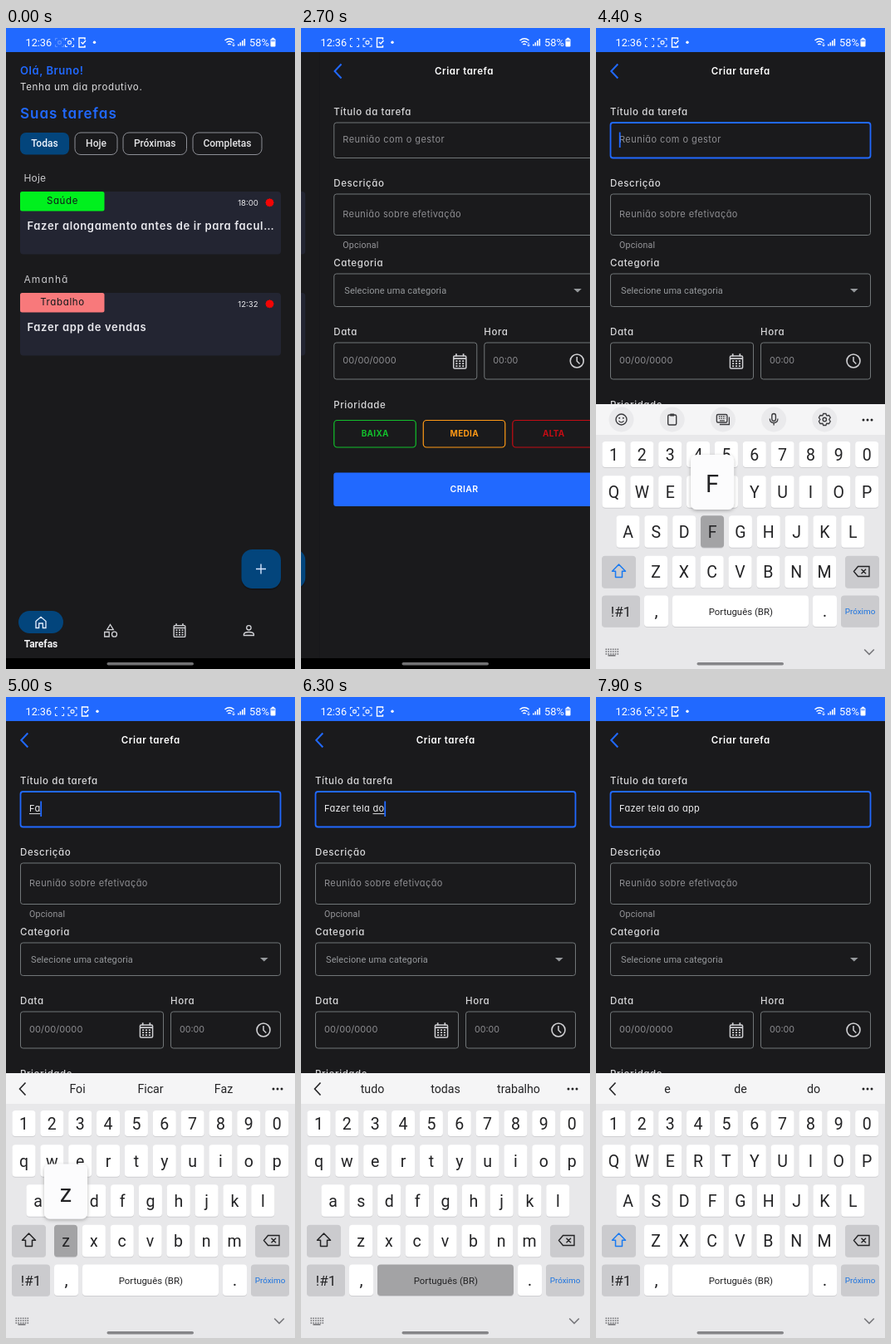
Recreate the animation shown at these times as an HTML page. Size 348 by 772 pixels, loop 8000 ms.

```html
<!DOCTYPE html>
<html lang="pt-BR">
<head>
<meta charset="utf-8">
<title>Tarefas</title>
<style>
html, body { margin: 0; width: 100%; height: 100%; overflow: hidden; background: #1a1a1c; }
svg { display: block; }
text { white-space: pre; font-family: Inter, "Open Sans", sans-serif; font-feature-settings: "cv11"; }
text.r { font-family: Roboto, "Noto Sans", sans-serif; }
</style>
</head>
<body>
<svg id="stage" width="348" height="772" viewBox="0 0 348 772"></svg>
<script>
const LOOP = 8000, STEP = 100;
const BG = '#1a1a1c', BLUE = '#2169ff', NAVY = '#03457c', INK = '#232325';
const stage = document.getElementById('stage');
const $ = id => document.getElementById(id);
const clamp = v => Math.max(0, Math.min(1, v));
const show = (id, on) => $(id).setAttribute('visibility', on ? 'inherit' : 'hidden');

// ---- drawing helpers
function txt(s, x, y, size, fill, o = {}) {
  return `<text ${o.id ? `id="${o.id}"` : ''} class="${o.r ? 'r' : ''}" x="${x}" y="${y}" font-size="${size}" fill="${fill}"` +
    ` font-weight="${o.w || 400}" letter-spacing="${o.sp || 0}" text-anchor="${o.mid ? 'middle' : 'start'}">${s}</text>`;
}
function box(x, y, x2, y2, r, fill, stroke = 'none', more = '') {
  return `<rect x="${x}" y="${y}" width="${x2 - x}" height="${y2 - y}" rx="${r}" fill="${fill}" stroke="${stroke}" ${more}/>`;
}
function line(d, color, w = 1.3, more = '') {
  return `<path d="${d}" fill="none" stroke="${color}" stroke-width="${w}" ${more}/>`;
}
function dot(x, y, r, fill, more = '') {
  return `<circle cx="${x}" cy="${y}" r="${r}" fill="${fill}" ${more}/>`;
}
function group(id, body, more = '') {
  return `<g id="${id}" ${more}>${body}</g>`;
}
function at(x, y, body) {
  return `<g transform="translate(${x} ${y})">${body}</g>`;
}
function burst(x, y) {
  const pts = [];
  for (let i = 0; i < 24; i++) {
    const r = i % 2 ? 4.5 : 5.3, a = i * Math.PI / 12;
    pts.push((x + r * Math.cos(a)).toFixed(1) + ',' + (y + r * Math.sin(a)).toFixed(1));
  }
  return `<polygon points="${pts.join(' ')}" fill="#f20505"/>`;
}
function calendar(c, s) {
  let d = '';
  for (let r = 0; r < 3; r++) for (let k = 0; k < 3; k++) d += box(-4.6 + k * 3.6, -1.6 + r * 2.8, -2.6 + k * 3.6, 0 + r * 2.8, 0, c);
  return `<g transform="scale(${s})">` + box(-7, -6.5, 7, 7.5, 1.2, 'none', c, 'stroke-width="1.4"') +
    line('M-7 -3.6H7M-4 -9V-6M4 -9V-6', c, 1.6) + d + '</g>';
}

// ---- status bar
function scanIcon(id, x) {
  return group(id, line('M-5 -2.5V-5H-2.5M2.5 -5H5V-2.5M5 2.5V5H2.5M-2.5 5H-5V2.5', '#dce8ff', 1.1) +
    group(id + 'Dot', `<circle r="2" fill="none" stroke="#dce8ff" stroke-width="1.3"/>`), `transform="translate(${x} 17.5)"`);
}
function statusBar() {
  const bars = [0, 1, 2, 3].map(i => box(279 + i * 2.5, 19.5 - i * 2.2, 280.6 + i * 2.5, 21.5, .3, '#fff')).join('');
  return box(0, 0, 348, 29, 0, BLUE) +
    txt('12:36', 23.5, 21.8, 12.7, '#fff', { r: 1 }) +
    scanIcon('scanA', 64.5) +
    group('icons', scanIcon('scanB', 80) +
      line('M98.5 14V12H91.5V23H98.5V21', '#fff', 1.4) + line('M94 17L96 19L99.5 15', '#fff', 1.4) + dot(110, 17.3, 1.7, '#fff')) +
    line('M263.5 15Q269 10.5 274.5 15M265.5 17.5Q269 14.5 272.5 17.5', '#fff', 1.5) +
    line('M267.3 19.8Q269 18.5 270.7 19.8', '#fff', 1.5) + line('M274 17.5V22M272.4 20.5L274 22L275.6 20.5', '#fff', .9) +
    bars + txt('58%', 293, 21.8, 12.9, '#fff', { r: 1 }) +
    box(318.5, 13, 324.5, 22.5, 1, '#fff') + box(320, 11.8, 323, 13, 0, '#fff') + box(319.3, 14, 323.7, 16.5, 0, '#8db2ff');
}

// ---- task list
function chip(x, x2, s, on) {
  return box(x, 126, x2, 152.5, 7, on ? NAVY : 'none', on ? 'none' : '#8d8f96') +
    txt(s, (x + x2) / 2, 143.3, 12, on ? '#f1f6ff' : '#e4e4e6', { r: 1, w: 500, mid: 1 });
}
function card(y, tag, color, time, title) {
  return box(17, y, 331, y + 75.5, 4, '#232532') + box(17, y, 118.5, y + 23.5, 2.5, color) +
    txt(tag, 68, y + 15, 11.5, '#10181a', { sp: .65, mid: 1 }) +
    txt(time, 291.5, y + 16.7, 9.6, '#e8e8ec', { mid: 1 }) + burst(317.5, y + 13.3) +
    txt(title, 25.5, y + 46, 13, '#e9e9ee', { w: 600, sp: .64 });
}
function home() {
  const c = '#d3d4d8';
  return box(0, 29, 348, 759, 0, BG) +
    txt('Olá, Bruno!', 17, 56, 13, BLUE, { w: 600, sp: .55 }) +
    txt('Tenha um dia produtivo.', 17, 75.3, 11.5, '#dededf', { sp: .66 }) +
    txt('Suas tarefas', 17, 109, 17, BLUE, { w: 600, sp: 1 }) +
    chip(17, 76, 'Todas', 1) + chip(83, 134, 'Hoje') + chip(141, 217.5, 'Próximas') + chip(225, 308, 'Completas') +
    txt('Hoje', 21.5, 185, 12, '#c9c9cc', { sp: .2 }) +
    card(197, 'Saúde', '#00f01e', '18:00', 'Fazer alongamento antes de ir para facul…') +
    txt('Amanhã', 21.5, 307, 12, '#c9c9cc', { sp: 1.05 }) +
    card(319, 'Trabalho', '#f8797b', '12:32', 'Fazer app de vendas') +
    box(283.5, 629.5, 331, 677, 13, '#121214', 'none', 'opacity=".6"') +
    box(283.5, 628, 331, 675, 13, NAVY) + dot(307, 651.5, 22, '#fff', 'id="ripple" opacity="0"') +
    line('M301 651.5H313M307 645.5V657.5', '#d8e7ff', 1.4) +
    box(15, 702, 69, 729, 13.5, NAVY) +
    line('M36 714.5L42 709.3L48 714.5V722.5H44.3V717H39.7V722.5H36Z', '#e6f0ff', 1.3) +
    txt('Tarefas', 42, 746, 12, '#f3f3f5', { r: 1, w: 700, mid: 1 }) +
    line('M125.5 718.5L129.3 724.6H121.7ZM118.7 727.5H124.2V733H118.7Z', c) +
    `<circle cx="130.5" cy="730.2" r="3" fill="none" stroke="${c}" stroke-width="1.3"/>` +
    at(209, 726, calendar(c, .98)) +
    `<circle cx="292.4" cy="722.3" r="2.7" fill="none" stroke="${c}" stroke-width="1.3"/>` +
    line('M286.4 731.5V730Q287 727.5 292.4 727.5T298.4 730V731.5Z', c);
}

// ---- form
const field = (x, y, x2, y2, more) => box(x, y, x2, y2, 3, 'none', '#717678', more);
const label = (s, x, y) => txt(s, x, y, 11.5, '#d8d8da', { w: 500, sp: .58 });
function level(x, s, c) {
  return box(x, 472.5, x + 98.5, 505, 4, 'none', c, 'stroke-width="1.2"') + txt(s, x + 49.5, 491.6, 10, c, { w: 700, sp: .3, mid: 1 });
}
function form() {
  const hint = '#8e8e92', icon = '#d0d0d3';
  return box(0, 29, 348, 759, 0, BG) +
    line('M26.3 43.5L18.3 52L26.3 60.5', BLUE, 2) +
    txt('Criar tarefa', 174.3, 55.5, 11.5, '#fff', { w: 600, sp: .55, mid: 1 }) +
    label('Título da tarefa', 17, 104.6) + field(17.5, 114, 330.5, 156.5, 'id="titleBox"') +
    txt('Reunião com o gestor', 28, 138.3, 11, hint, { sp: .45, id: 'titleHint' }) +
    txt('', 28, 138.3, 11, '#f0f0f2', { sp: .34, id: 'typed' }) +
    line('', '#f0f0f2', .9, 'id="under"') + line('', BLUE, 1.8, 'id="caret"') +
    label('Descrição', 17, 190.6) + field(17.5, 200, 330.5, 249.5) +
    txt('Reunião sobre efetivação', 28, 227.8, 11, hint, { sp: .4 }) +
    txt('Opcional', 28, 265, 10.6, '#97979b', { r: 1, sp: .2 }) +
    label('Categoria', 17, 286.6) + field(17.5, 296, 330.5, 335.5) +
    txt('Selecione uma categoria', 30, 320, 11, '#96999c', { r: 1, sp: .1 }) +
    '<path d="M306 314H315.6L310.8 318.6Z" fill="#96999c"/>' +
    label('Data', 17, 369.6) + label('Hora', 198, 369.6) +
    field(17.5, 379, 189.5, 423) + field(198.5, 379, 330.5, 423) +
    txt('00/00/0000', 28, 404, 11, hint, { sp: .1 }) + txt('00:00', 209, 404, 10.7, hint) +
    at(169, 402, calendar(icon, 1.08)) +
    `<circle cx="310" cy="401" r="8" fill="none" stroke="${icon}" stroke-width="1.6"/>` + line('M310 396V401.3L313.3 404.5', icon, 1.5) +
    label('Prioridade', 17, 457.6) +
    level(17.5, 'BAIXA', '#12c02c') + level(125, 'MEDIA', '#ff9a16') + level(232.5, 'ALTA', '#c40c14') +
    box(17, 535.5, 331, 576, 3, BLUE) + txt('CRIAR', 174.3, 558.5, 10.5, '#fff', { w: 600, sp: .4, mid: 1 });
}

// ---- keyboard
const ROWS = [['1234567890', 21.5, 513.5, 15.5], ['qwertyuiop', 21.5, 558.5, 19.2], ['asdfghjkl', 38.5, 606.5, 19.2], ['zxcvbnm', 72, 655, 19.2]];
const keys = {};
function keyBox(x, y, x2, y2, fill, more = '') {
  return box(x, y + 1, x2, y2 + 1, 4, '#cfcfd2') + box(x, y, x2, y2, 4, fill, 'none', more);
}
function keyboard() {
  const soft = '#cbcbce';
  let s = box(0, 453, 348, 772, 0, '#e8e8ea') + box(0, 453, 348, 490, 0, '#f5f5f6');
  for (const [chars, x0, y, h] of ROWS)
    [...chars].forEach((c, i) => {
      const x = x0 + i * 33.85;
      keys[c] = { x, y };
      s += keyBox(x - 14, y - h, x + 14, y + h, '#fff', `id="b_${c}"`) + txt(c, x, y + 7, 19.5, INK, { r: 1, mid: 1, id: 'k_' + c });
    });
  s += keyBox(7, 635.8, 48, 674, soft) + keyBox(300, 635.8, 341, 674, soft) +
    line('M27.5 646L35.5 654.3H31.5V661.5H23.5V654.3H19.5Z', INK, 1.5, 'id="shift" stroke-linejoin="round"') +
    line('M310.5 654.5L315.5 648.5H329V660.5H315.5ZM319.5 651.8L325 657.3M325 651.8L319.5 657.3', INK, 1.4) +
    keyBox(7, 683.5, 53, 721, soft) + txt('!#1', 30, 708.5, 17, INK, { r: 1, mid: 1 }) +
    keyBox(58, 683.5, 87, 721, '#fff') + txt(',', 72.5, 709, 21, INK, { r: 1, mid: 1 }) +
    keyBox(92, 683.5, 256, 721, '#fff', 'id="b_ "') + txt('Português (BR)', 174.3, 706.5, 11.4, INK, { r: 1, mid: 1 }) +
    keyBox(261, 683.5, 290, 721, '#fff') + txt('.', 275.5, 709, 21, INK, { r: 1, mid: 1 }) +
    keyBox(295, 683.5, 341, 721, soft) + txt('Próximo', 318, 706, 9.9, '#1a73e0', { r: 1, mid: 1 });
  return s + toolbar() +
    group('sugs', line('M23.5 464.5L16.5 472L23.5 479.5', INK, 1.6) +
      [0, 1, 2].map(i => txt('', 86 + 88 * i, 477, 14.2, INK, { r: 1, mid: 1, id: 'sug' + i })).join('')) +
    [0, 1, 2].map(i => dot(322 + i * 5, 472, 1.5, INK)).join('');
}
function toolbar() {
  const c = '#3a3a3d';
  const ring = (x, y, r) => `<circle cx="${x}" cy="${y}" r="${r}" fill="none" stroke="${c}" stroke-width="1.4"/>`;
  const icons = [
    ring(0, 0, 6.5) + dot(-2.3, -1.8, 1, c) + dot(2.3, -1.8, 1, c) + line('M-3 1.6Q0 5.2 3 1.6', c),
    box(-5, -5.5, 5, 6.5, 1.5, 'none', c, 'stroke-width="1.4"') + box(-2.5, -7, 2.5, -4, .5, c),
    box(-7.5, -6, 5, 3.5, 1.5, 'none', c, 'stroke-width="1.4"') + line('M-5 -3.5H3M-5 -1.2H3', c, 1.3, 'stroke-dasharray="1.5 1"') + line('M-4 1.4H2M-4 6H7.5V-3', c),
    box(-2.3, -7, 2.3, 1.8, 2.3, 'none', c, 'stroke-width="1.4"') + line('M-4.8 -1Q-4.8 4 0 4T4.8 -1M0 4V7', c),
    ring(0, 0, 2.2) + line('M-1.6 -7H1.6L2.4 -4.8L5.3 -5L6.9 -2.2L5.4 0L6.9 2.2L5.3 5L2.4 4.8L1.6 7H-1.6L-2.4 4.8L-5.3 5L-6.9 2.2L-5.4 0L-6.9 -2.2L-5.3 -5L-2.4 -4.8Z', c, 1.3)
  ];
  return group('tools', icons.map((s, i) => at(30.5 + 61.2 * i, 471.5, dot(0, 0, 15, '#eaeaec') + s)).join(''));
}
function sysIcons() {
  let s = '';
  for (let r = 0; r < 3; r++) for (let i = 0; i < 6; i++) s += `<rect x="${11.5 + i * 2.8}" y="${747.5 + r * 2.8}" width="1.6" height="1.6"/>`;
  return group('sys', s + '<rect x="14.5" y="755" width="9" height="1.6"/>' +
    '<path d="M323.2 748.5L329 754.3L334.8 748.5" fill="none" stroke="currentColor" stroke-width="1.6"/>', 'fill="currentColor"');
}

stage.innerHTML =
  '<defs><filter id="soft" x="-30%" y="-30%" width="160%" height="160%"><feDropShadow dx="0" dy="1.5" stdDeviation="2" flood-opacity=".28"/></filter></defs>' +
  box(0, 0, 348, 772, 0, BG) + group('home', home()) + group('form', form()) + box(0, 759, 348, 772, 0, '#000') +
  box(0, 453, 348, 772, 0, '#171719', 'none', 'id="cover"') +
  group('kb', keyboard()) + sysIcons() +
  group('pop', box(-26, 0, 26, 66, 7, '#fcfcfd', 'none', 'filter="url(#soft)"') + txt('', 0, 45, 29, INK, { r: 1, mid: 1, id: 'popTxt' })) +
  box(121.5, 764, 226, 767.6, 1.8, '#727274', 'none', 'id="handle"') + statusBar();

// ---- timeline
const FOCUS = 3100, LOWER = 4900, UPPER = 7600;
const PRESSES = [['F', 4400], ['a', 4900], ['z', 5000], ['e', 5100], ['r', 5200], [' ', 5300], ['t', 5400], ['e', 5500], ['l', 5600],
  ['a', 5800], [' ', 5900], ['d', 6000], ['o', 6100], [' ', 6300], ['a', 6600], ['p', 6800], ['p', 7000], [' ', 7200]];
const HINTS = [[4700, 'Foi Ficar Faz'], [5600, 'Favor Fazer Fala'], [6000, 'tudo todas trabalho'],
  [6600, 'do de da'], [7100, 'a as ao'], [7500, 'e de do']];

function drawText(t) {
  const done = PRESSES.filter(p => t >= p[1] + 100);
  const str = done.map(p => p[0]).join('');
  const last = done.length ? done[done.length - 1][1] + 100 : FOCUS;
  const el = $('typed');
  const width = s => { el.textContent = s; return s ? el.getComputedTextLength() : 0; };
  const start = 28 + width(str.slice(0, str.lastIndexOf(' ') + 1)), end = 28 + width(str);
  $('under').setAttribute('d', end > start ? `M${start} 140.6H${end}` : '');
  const on = t >= FOCUS && (t - last) % 1000 < 500;
  $('caret').setAttribute('d', on ? `M${end + .7} 125.5V144` : '');
  show('titleHint', !str);
  $('titleBox').setAttribute('stroke', t >= FOCUS ? BLUE : '#717678');
  $('titleBox').setAttribute('stroke-width', t >= FOCUS ? 1.8 : 1);
}

function drawKeys(t) {
  const upper = t < LOWER || t >= UPPER;
  for (const c in keys) {
    $('k_' + c).textContent = upper ? c.toUpperCase() : c;
    $('b_' + c).setAttribute('fill', '#fff');
  }
  $('b_ ').setAttribute('fill', '#fff');
  $('shift').setAttribute('stroke', upper ? '#1a7af0' : INK);
  const hit = PRESSES.filter(p => t >= p[1] && t < p[1] + 200).pop();
  const letter = hit && hit[0] !== ' ';
  show('pop', letter);
  if (hit && t < hit[1] + 100) $('b_' + hit[0].toLowerCase()).setAttribute('fill', '#a3a3a5');
  if (letter) {
    const k = keys[hit[0].toLowerCase()];
    $('pop').setAttribute('transform', `translate(${Math.max(32, Math.min(316, k.x))} ${k.y - 92.5})`);
    $('popTxt').textContent = hit[0];
  }
  const hint = HINTS.filter(h => t >= h[0]).pop();
  show('tools', !hint);
  show('sugs', hint);
  if (hint) hint[1].split(' ').forEach((w, i) => {
    $('sug' + i).textContent = w;
    $('sug' + i).setAttribute('opacity', clamp(.4 + (t - hint[0]) / (160 + 80 * i)));
  });
}

function draw(t) {
  const enter = clamp(t / 300);
  $('scanA').setAttribute('opacity', .3 + .7 * enter);
  $('icons').setAttribute('transform', `translate(${-3.5 * (1 - enter)} 0)`);
  show('scanADot', t < 1900 || t >= 5900);

  const slide = 1 - (1 - clamp((t - 2400) / 500)) ** 3;
  $('home').setAttribute('transform', `translate(${-348 * slide} 0)`);
  $('form').setAttribute('transform', `translate(${348 * (1 - slide)} 0)`);
  const press = clamp((t - 2150) / 200);
  $('ripple').setAttribute('r', 22 * press);
  $('ripple').setAttribute('opacity', press ? .16 * (1 - clamp((t - 2400) / 200)) : 0);

  const rise = 1 - (1 - clamp((t - 3250) / 340)) ** 2;
  $('kb').setAttribute('transform', `translate(0 ${319 * (1 - rise)})`);
  $('kb').setAttribute('opacity', rise);
  show('kb', rise > 0);
  show('cover', rise > 0);
  show('sys', rise > 0);
  $('sys').setAttribute('color', t < 4000 ? '#fff' : '#77777b');
  $('handle').setAttribute('fill', rise > 0 ? (t < 4000 ? '#dcdcde' : '#858588') : '#727274');
  drawText(t);
  drawKeys(t);
}

const t0 = performance.now();
let shown = -1;
function tick() {
  const t = Math.floor(((performance.now() - t0 + 15) % LOOP) / STEP) * STEP;
  if (t !== shown) draw(shown = t);
  requestAnimationFrame(tick);
}
tick();
</script>
</body>
</html>
```
